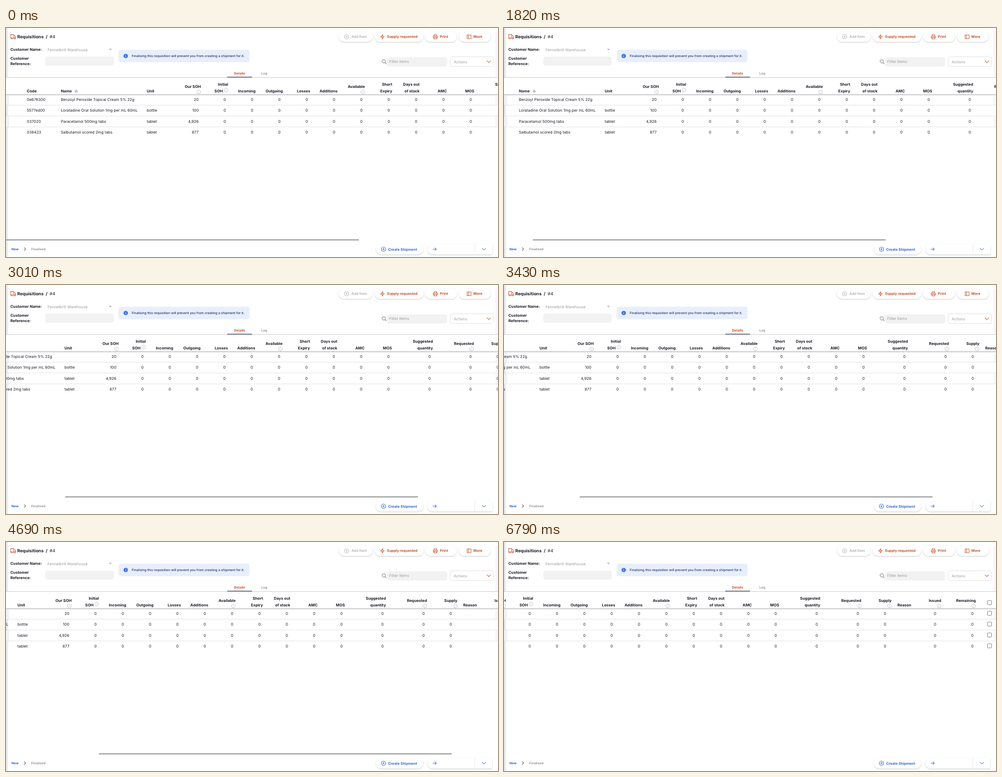
These frames come from a looping animation (1094 by 512 pixels, 7 s). An HTML page:

```html
<!DOCTYPE html>
<html lang="en">
<head>
<meta charset="utf-8">
<title>Requisition details</title>
<style>
  html, body { margin: 0; width: 100%; height: 100%; overflow: hidden; background: #fff; }
  svg { display: block; width: 100vw; height: 100vh; fill: none; }
  text { font: 8.51px Inter, sans-serif; fill: #1c1c28; text-rendering: geometricPrecision; white-space: pre; }
  .bold { font-weight: 700; }
  .title { font-size: 9.72px; }
  .button { font-size: 7.88px; font-weight: 700; }
  .small { font-size: 7.29px; font-weight: 700; }
  .notice { font-size: 7.25px; font-weight: 500; fill: #1d3067; }
  .muted { fill: #9c9ca2; }
  .pill { fill: #fff; filter: drop-shadow(0 1px 1.3px #0000003a); }
  .orange { stroke: #cb5029; }
  .blue { stroke: #3568d4; }
  .grey { stroke: #b9b9be; }
  .orangeText { fill: #cb5029; }
  .blueText { fill: #3568d4; }
  .greyText { fill: #b9b9be; }
  .icon { stroke-width: 1.05; stroke-linecap: round; stroke-linejoin: round; }
</style>
</head>
<body>
<svg viewBox="0 0 1094 512" preserveAspectRatio="none">
  <defs>
    <linearGradient id="edge"><stop stop-color="#dedee2"/><stop offset="1" stop-color="#fff"/></linearGradient>
    <linearGradient id="under" x2="0" y2="1"><stop stop-color="#cfcfd3"/><stop offset="1" stop-color="#fff" stop-opacity="0"/></linearGradient>
  </defs>
  <g id="backdrop">
    <path fill="url(#edge)" d="M0 0h6v512H0z"/>
    <path fill="#f7f7f9" d="M1088 8h6v102h-6zM1088 153h6v19h-6zM1088 197h6v24h-6z"/>
    <path fill="#f2f2f4" d="M0 149h10q-3 1-3 4v19H0zM0 197h7v24H0z"/>
    <path fill="#fff" d="M0 111h1094v37H0z"/>
    <path stroke="#e0e0e3" d="M0 172.5h1094M0 196.8h1094M0 221.2h1094"/>
    <path stroke="#c6c6cb" d="M0 110.7h1094"/>
    <path stroke="#b9b9be" stroke-width=".9" d="M0 148.4h1094"/>
    <path fill="url(#under)" d="M0 149h1094v4H0z"/>
    <path stroke="#3e4a6d" stroke-width="1.4" d="M492 109.8h55"/>
  </g>
  <g id="table"></g>
  <rect id="thumb" y="472.4" width="785" height="2.6" rx="1.3" fill="#9b9b9b"/>
  <g id="chrome">
    <g class="icon orange">
      <path d="M11.6 22.7h-1.3v-8.1h7v8.1h-2.8M17.3 17.2h2.5l1.8 2.2v3.3h-.8"/>
      <circle cx="13" cy="23" r="1.5"/><circle cx="19.2" cy="23" r="1.5"/>
    </g>
    <rect x="87.5" y="64" width="152" height="20.3" rx="5" fill="#f2f2f3"/>
    <path fill="#b3b3b8" d="M229 46.6h6.4l-3.2 3.3z"/>
    <rect x="250.5" y="48.6" width="291" height="27.8" rx="5" fill="#e8effc"/>
    <circle cx="266.2" cy="62.6" r="4.9" fill="#3f74dc"/>
    <path stroke="#fff" stroke-width="1.1" d="M266.2 62v3M266.2 59.7v1.1"/>
    <g class="icon" stroke="#72727c"><circle cx="840" cy="74.6" r="3.7"/><path d="M842.8 77.4l2.8 2.8"/></g>
    <rect x="847.3" y="65.6" width="133.7" height="20.6" rx="5" fill="#f2f2f3"/>
    <rect x="987.5" y="64.5" width="97" height="21.6" rx="4.5" stroke="#dedee1"/>
    <path class="icon orange" stroke-width="1.3" d="M1069.6 73.4l4 4 4-4"/>
    <path class="icon" stroke="#4a4a55" d="M40.4 491l3.2 3.2-3.2 3.2"/>
    <path class="pill" d="M948.7 483h129q4 0 4 4v15.5q0 4-4 4h-129a11.75 11.75 0 0 1 0-23.5z"/>
    <path stroke="#e6e6ea" d="M1042.5 483v23.5"/>
    <path class="icon blue" d="M949 494.5h8M953.8 491.3l3.2 3.2-3.2 3.2M1058.8 492.7l3.8 3.8 3.8-3.8"/>
  </g>
</svg>
<script>
const byId = id => document.getElementById(id);
const table = byId("table"), chrome = byId("chrome"), thumb = byId("thumb");

function add(parent, tag, attributes, content = "") {
  const node = document.createElementNS("http://www.w3.org/2000/svg", tag);
  for (const key in attributes) node.setAttribute(key, attributes[key]);
  node.textContent = content;
  parent.append(node);
}
const text = (parent, x, y, content, style = "", anchor = "start") =>
  add(parent, "text", { x, y, class: style, "text-anchor": anchor }, content);

function pill(x, y, width, label, labelX, colour, iconPath) {
  add(chrome, "rect", { x, y, width, height: 23.5, rx: 11.75, class: "pill" });
  add(chrome, "path", { d: iconPath, class: "icon " + colour });
  text(chrome, labelX, y + 14.6, label, `button ${colour}Text`);
}
const circlePath = (x, y, r) => `M${x - r} ${y}a${r} ${r} 0 1 1 ${2 * r} 0a${r} ${r} 0 1 1 ${-2 * r} 0`;
const plusPath = (x, y) => circlePath(x, y, 4.8) + `M${x - 2.2} ${y}h4.4M${x} ${y - 2.2}v4.4`;

// Page header, filters and footer
text(chrome, 25, 22.8, "Requisitions", "title bold");
text(chrome, 88.6, 22.8, "/", "title bold");
text(chrome, 97, 22.8, "#4", "title");
text(chrome, 9.8, 51.2, "Customer Name:", "bold");
text(chrome, 9.8, 71.2, "Customer", "bold");
text(chrome, 9.8, 83.2, "Reference:", "bold");
text(chrome, 92.3, 52.3, "Fennelbrill Warehouse", "muted");
text(chrome, 279.5, 65.2, "Finalising this requisition will prevent you from creating a shipment for it.", "notice");
text(chrome, 852, 78.3, "Filter items", "muted");
text(chrome, 995.4, 78.5, "Actions", "muted");
text(chrome, 519.4, 104.2, "Details", "small orangeText", "middle");
text(chrome, 574.3, 104.2, "Log", "small muted", "middle");
text(chrome, 12, 497, "New", "small blueText");
text(chrome, 56, 497, "Finalised", "small muted");
pill(740, 7.8, 75.5, "Add Item", 768, "grey", plusPath(757.3, 19.5));
pill(820, 7.8, 108, "Supply requested", 847, "orange", "M838 14.8l-5 5.6h4l-.8 4.2 5-5.6h-4z");
pill(932, 7.8, 70.5, "Print", 964.8, "orange",
  "M952 18v-3.2h5.4V18M951.8 22.2h-1.6V18h9v4.2h-1.6M952 20.6h5.4v3.8H952z");
pill(1007, 7.8, 71, "More", 1039.3, "orange", "M1025.3 15.4h8.8v8.4h-8.8zM1028.2 15.4v8.4");
pill(822.5, 483, 105, "Create Shipment", 849.7, "blue", plusPath(839.4, 494.5));

// Table
const rowY = row => 163.1 + 24.3 * row;
const rows = [
  ["0e676300", "Benzoyl Peroxide Topical Cream 5% 22g", "", "20"],
  ["5577ed00", "Loratadine Oral Solution 1mg per mL 60mL", "bottle", "100"],
  ["037020", "Paracetamol 500mg tabs", "tablet", "4,926"],
  ["038423", "Salbutamol scored 2mg tabs", "tablet", "877"],
];

function infoIcon(x, y) {
  add(table, "path", { d: circlePath(x, y, 4.2) + `M${x} ${y - .5}v2.4M${x} ${y - 2.1}v.8`, stroke: "#a2a2a8", "stroke-width": .7 });
}

[["Code", 46.3], ["Name", 122], ["Unit", 313]].forEach(([name, x], i) => {
  text(table, x, 143.6, name, "bold");
  rows.forEach((row, r) => text(table, x, rowY(r), row[i]));
});
add(table, "path", { d: "M153.3 143l2.8-4.8 2.8 4.8z", stroke: "#55555f", "stroke-width": .8 });

function numberColumn(right, name, { info = false, inset = 5, values = () => "0" } = {}) {
  const [first, second] = name.split("|");
  if (second) {
    text(table, right, 129.1, first, "bold", "end");
    text(table, info ? right - 12 : right, 143.6, second, "bold", "end");
    if (info) infoIcon(right - 5, 138.9);
  } else {
    text(table, right, info ? 133.7 : 143.6, first, "bold", "end");
    if (info) infoIcon(right - 4.8, 142.9);
  }
  rows.forEach((row, r) => text(table, right - inset, rowY(r), values(row), "", "end"));
}

const info = true;
const evenColumns = [
  ["Our SOH", { info, values: row => row[3] }], ["Initial|SOH", { info }], ["Incoming"], ["Outgoing"],
  ["Losses"], ["Additions"], ["Available", { info }], ["Short|Expiry"], ["Days out|of stock"], ["AMC"], ["MOS"],
];
evenColumns.forEach(([name, options], i) => numberColumn(433.3 + 60.78 * i, name, options));
numberColumn(1132.3, "Suggested|quantity");
numberColumn(1223.5, "Requested", { info });
numberColumn(1291.2, "Supply", { info, inset: 12 });
text(table, 1304, 143.6, "Reason", "bold");
numberColumn(1401.3, "Issued", { info, inset: 11 });
numberColumn(1478.3, "Remaining", { info });
[135.6, ...rows.map((_, r) => rowY(r) - 3.8)].forEach(y =>
  add(table, "rect", { x: 1504.2, y: y - 4.6, width: 9.2, height: 9.2, rx: 1.6, stroke: "#6d6d76" }));

// Scroll position over time: [ms, px], joined by monotone cubics
const scrollKeys = [[0, 0], [1330, 0], [1820, 89], [1960, 96], [2170, 96], [3010, 183], [3920, 276], [4130, 279],
  [4410, 279], [4690, 287.5], [5460, 402.4], [5670, 420], [6020, 420], [6160, 429.2], [7000, 429.2]];

const secant = i => (scrollKeys[i + 1][1] - scrollKeys[i][1]) / (scrollKeys[i + 1][0] - scrollKeys[i][0]);
function slope(i) {
  if (i === 0 || i === scrollKeys.length - 1) return 0;
  const before = secant(i - 1), after = secant(i);
  return before * after > 0 ? 2 * before * after / (before + after) : 0;
}
function scrollAt(time) {
  const i = scrollKeys.findIndex(key => key[0] > time) - 1;
  const [t0, p0] = scrollKeys[i], [t1, p1] = scrollKeys[i + 1];
  const span = t1 - t0, u = (time - t0) / span, v = 1 - u;
  return p0 * v * v * (1 + 2 * u) + p1 * u * u * (3 - 2 * u)
    + span * u * v * (slope(i) * v - slope(i + 1) * u);
}

const LOOP = 7000, STEP = 70, THUMB_RATIO = 0.718;
function draw(now) {
  const time = Math.floor((now % LOOP) / STEP) * STEP;
  const scroll = scrollAt(time);
  table.setAttribute("transform", `translate(${-scroll})`);
  thumb.setAttribute("x", scroll * THUMB_RATIO);
  thumb.setAttribute("opacity", Math.min(1, Math.max(0, (6790 - time) / 280)));
}
const start = performance.now();
function tick() {
  draw(performance.now() - start);
  requestAnimationFrame(tick);
}
tick();
</script>
</body>
</html>
```
